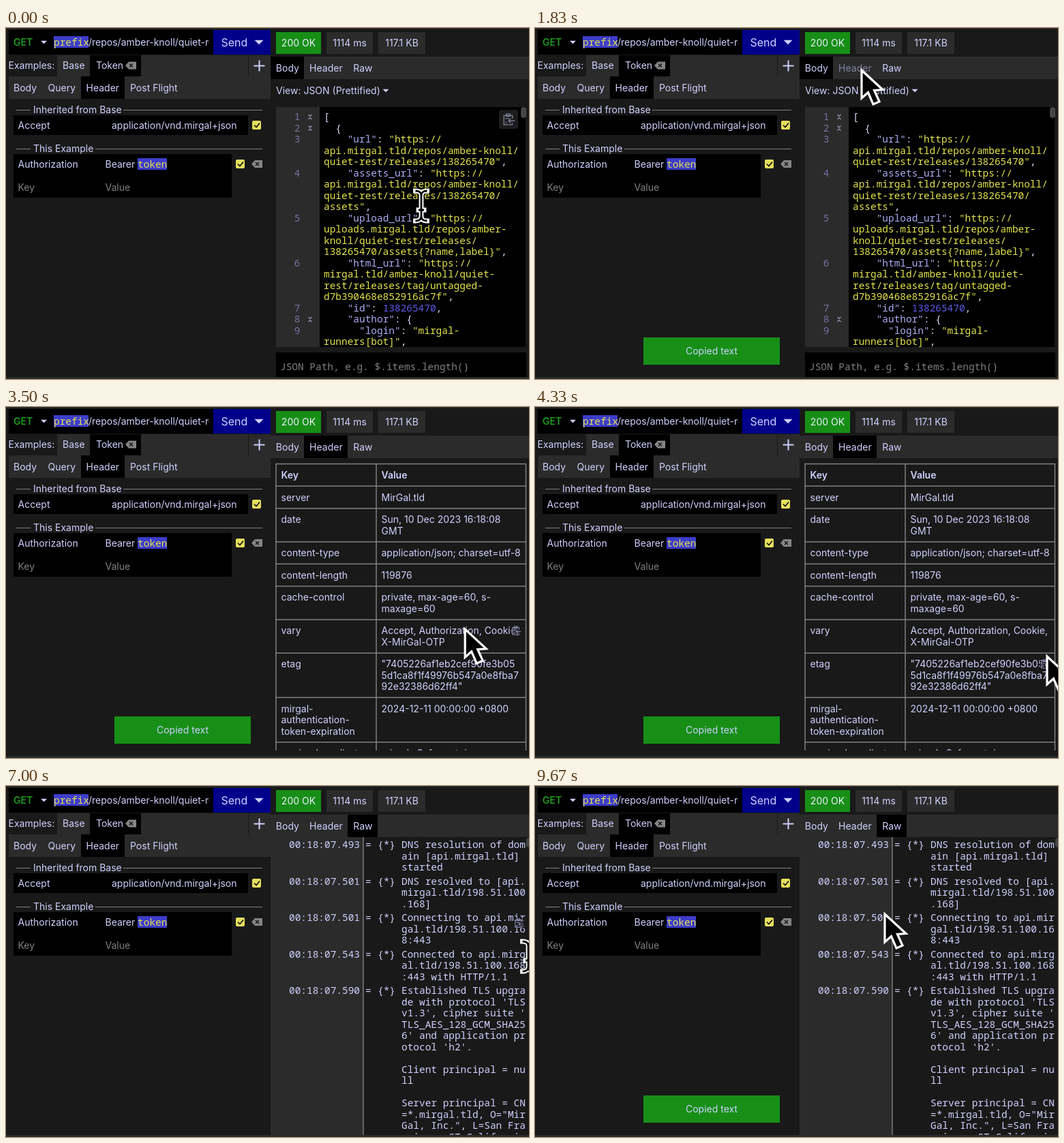
Animation, 767 px wide and 515 px high, one loop 9840 ms. Source, as an HTML page:

```html
<!DOCTYPE html>
<html lang="en">
<head>
<meta charset="utf-8">
<title>HTTP client</title>
<style>
  html, body { margin: 0; width: 100%; height: 100%; overflow: hidden; background: #191919; }
  svg { display: block; width: 767px; height: 515px; }
  text { font: 14px Inter, sans-serif; white-space: pre; }
  .mono { font: 14.45px "Noto Sans Mono", monospace; }
  .big { font-size: 16px; }
  .bold { font-weight: 600; }
</style>
</head>
<body>
<svg id="stage" viewBox="0 0 767 515"></svg>
<script>
const INK = '#d0d0ff', PANEL = '#191919', LIGHT = '#2b2b2b', GREEN = '#178f17',
      YELLOW = '#e4e44c', GRAY = '#808080';
const stage = document.getElementById('stage');

function el(tag, attrs, parent = stage) {
  const node = document.createElementNS('http://www.w3.org/2000/svg', tag);
  for (const key in attrs) node.setAttribute(key, attrs[key]);
  return parent.appendChild(node);
}
const group = (parent = stage) => el('g', {}, parent);
const box = (x, y, width, height, fill, parent, rx = 0) =>
  el('rect', { x, y, width, height, fill, rx }, parent);
const path = (d, stroke, width, parent, x = 0, y = 0) =>
  el('path', { d, stroke, 'stroke-width': width, fill: 'none', transform: `translate(${x} ${y})` }, parent);
const caret = (x, y, r, parent) =>
  el('path', { d: `M${x - r} ${y - r / 2}h${2 * r}l${-r} ${r}z`, fill: INK }, parent);

function text(x, y, str, parent, fill = INK, cls = '', anchor = 'start') {
  const node = el('text', { x, y, fill, class: cls, 'text-anchor': anchor }, parent);
  node.textContent = str;
  return node;
}
const mono = (x, y, str, parent, fill = INK, anchor) => text(x, y, str, parent, fill, 'mono', anchor);

function clipboard(x, y, size, color, parent) {
  const g = el('g', { transform: `translate(${x} ${y}) scale(${size / 16})` }, parent);
  path('M5-1V-5H-6V7H5V5M-3-7H2V-4H-3ZM8 2H0M3-1L0 2L3 5M-4-1H1M-4 4H-2', color, 1.2, g);
  return g;
}
function backspace(x, y, color) {
  el('path', { d: `M${x} ${y}l5-5.5h11v11h-11z`, fill: color });
  path('M6-2.5l5 5m0-5l-5 5', '#111', 1.4, stage, x, y);
}
function checkbox(x, y) {
  box(x, y, 13, 13, '#e6df5c', stage, 2);
  path('M3 6.5l3 3l5-6', '#111', 1.7, stage, x, y);
}

// Left pane
function drawRequest() {
  box(0, 0, 767, 1.5, LIGHT);
  box(4, 3, 300, 36, '#000');
  text(11, 26, 'GET', stage, '#1c9c1c', 'bold');
  caret(55.5, 21, 4.5);
  box(70, 12, 51, 17, '#3d3dcc');
  mono(70, 25.5, 'prefix', stage, YELLOW);
  text(121, 25.5, '/repos/amber-knoll/quiet-rest');
  box(298, 3, 6, 36, '#000');
  box(304, 3, 84, 36, '#00008b');
  text(315.5, 26.5, 'Send', stage, INK, 'big');
  caret(371, 21, 6.5);

  text(3.5, 60, 'Examples:');
  box(75, 40, 313, 31, LIGHT);
  text(83, 60, 'Base');
  box(123, 40, 75, 31, '#000');
  text(132, 60, 'Token');
  backspace(175, 55, '#858585');
  box(355, 40, 1, 31, PANEL);
  path('M363.5 55.5h16M371.5 47.5v16', INK, 2);

  box(4, 71, 384, 33, LIGHT);
  box(110, 71, 64, 33, '#000');
  [[11, 'Body'], [61.5, 'Query'], [117.5, 'Header'], [182, 'Post Flight']]
    .forEach(([x, label]) => text(x, 93, label));

  [[120, 'Inherited from Base', 172], [177, 'This Example', 131]].forEach(([y, label, x]) => {
    path(`M15 ${y + .5}H36M${x} ${y + .5}H376`, GRAY, 1);
    text(40, y + 5, label);
  });
  box(11, 128, 344, 29, '#000');
  text(17.5, 147.5, 'Accept');
  text(155, 147.5, 'application/vnd.mirgal+json');
  checkbox(361, 136);
  box(11, 185, 320, 64, '#000');
  text(17.5, 204.5, 'Authorization');
  text(145.5, 204.5, 'Bearer');
  box(193, 191, 43, 17, '#3d3dcc');
  mono(193, 204.5, 'token', stage, YELLOW);
  checkbox(337, 193);
  backspace(360, 199.5, '#858585');
  text(17.5, 239, 'Key', stage, GRAY);
  text(145.5, 239, 'Value', stage, GRAY);
}

// Right pane: status and tabs
const TABS = [['Body', 388, 49], ['Header', 437, 64], ['Raw', 501, 44]];
let tabNodes;
function drawStatus() {
  [[396, 66, '200 OK', GREEN], [470, 68, '1114 ms', LIGHT], [546, 69, '117.1 KB', LIGHT]]
    .forEach(([x, w, label, fill]) => {
      box(x, 6, w, 32, fill);
      text(x + w / 2, 27, label, stage, label === '200 OK' ? '#eeeeff' : INK, '', 'middle');
    });
  box(388, 42, 379, 33, LIGHT);
  tabNodes = TABS.map(([label, x, w]) => ({
    back: box(x, 42, w, 33, '#000'),
    label: text(x + w / 2 + .4, 64, label, stage, INK, '', 'middle')
  }));
}

const API = 'api.mirgal.tld/repos/amber-knoll/', ID = '138265470';
const JSON_LINES = [
  '[', '  {',
  '    "url": "https://', API, `quiet-rest/releases/${ID}",`,
  '    "assets_url": "https://', API, `quiet-rest/releases/${ID}/`, 'assets",',
  '    "upload_url": "https://', 'uploads.mirgal.tld/repos/amber-',
  'knoll/quiet-rest/releases/', `${ID}/assets{?name,label}",`,
  '    "html_url": "https://', 'mirgal.tld/amber-knoll/quiet-',
  'rest/releases/tag/untagged-', 'd7b390468e852916ac7f",',
  `    "id": ${ID},`, '    "author": {', '      "login": "mirgal-', 'runners[bot]",'
];
let copyAll;

function drawBody(g) {
  text(396, 96.5, 'View: JSON (Prettified)', g);
  caret(557, 92, 4.5, g);
  box(396, 116, 64, 352, LIGHT, g);
  box(460, 116, 302, 352, '#000', g);
  let number = 0;
  JSON_LINES.forEach((line, i) => {
    const y = 135 + 16.5 * i;
    const [, indent, key = '', value, end] = line.match(/^( *)("\w+": )?(.*?)([,{[]?)$/);
    if (indent || line === '[') mono(431.5, y, ++number, g, '#7474a4', 'end');
    if (/[{[]$/.test(line))
      path('M-2.5-3.5L0-1L2.5-3.5M-2.5 3.5L0 1L2.5 3.5', '#a0a0c4', 1.1, g, 446, y - 4.5);
    const row = mono(466, y, indent, g);
    const isNumber = key && /^\d/.test(value);
    [[key.slice(0, -2), '#acacf6'], [key.slice(-2), '#dedeff'],
     [value, isNumber ? '#5c5ce6' : YELLOW], [end, '#dedeff']]
      .forEach(([str, fill]) => { el('tspan', { fill }, row).textContent = str; });
  });
  box(396, 468, 371, 8, PANEL, g);
  copyAll = group(g);
  box(723, 120, 28, 28, '#1c1c1c', copyAll, 4);
  clipboard(737, 134, 18, '#80809c', copyAll);
  box(755, 116, 8, 16, '#474747', g, 4);
  box(396, 476, 367, 36, '#000', g);
  mono(402, 501.5, 'JSON Path, e.g. $.items.length()', g, GRAY);
}

const HEADERS = [
  ['Key', 'Value'], ['server', 'MirGal.tld'], ['date', 'Sun, 10 Dec 2023 16:18:08|GMT'],
  ['content-type', 'application/json; charset=utf-8'], ['content-length', '119876'],
  ['cache-control', 'private, max-age=60, s-|maxage=60'],
  ['vary', 'Accept, Authorization, Cookie,|X-MirGal-OTP'],
  ['etag', '"7405226af1eb2cef90fe3b05|5d1ca8f1f49976b547a0e8fba7|92e32386d62ff4"'],
  ['mirgal-|authentication-|token-expiration', '2024-12-11 00:00:00 +0800'],
  ['x-mirgal-media-type', 'mirgal.v3; format=json']
];
const headerTops = [];
function drawHeaders(g) {
  let top = 83.5;
  HEADERS.forEach((cells, i) => {
    const columns = cells.map(cell => cell.split('|'));
    columns.forEach((lines, c) => lines.forEach((line, n) =>
      text(c ? 550.5 : 403.5, top + 21.5 + 16.4 * n, line, g, INK, i ? '' : 'bold')));
    path(`M395 ${top}H763`, GRAY, 1.5, g);
    headerTops.push(top);
    top += 16.2 + 16.4 * Math.max(...columns.map(lines => lines.length));
  });
  path('M396 83V504M543 83V504M762.5 83V504', GRAY, 1.5, g);
  box(388, 504, 379, 8, PANEL, g);
}

const LOG = [
  ['493', 'DNS resolution of dom|ain [api.mirgal.tld] |started'],
  ['501', 'DNS resolved to [api.|mirgal.tld/198.51.100|.168]'],
  ['501', 'Connecting to api.mir|gal.tld/198.51.100.16|8:443'],
  ['543', 'Connected to api.mirg|al.tld/198.51.100.168|:443 with HTTP/1.1'],
  ['590', "Established TLS upgra|de with protocol 'TLS|v1.3', cipher suite '|TLS_AES_128_GCM_SHA25|" +
    "6' and application pr|otocol 'h2'.||Client principal = nu|ll||Server principal = CN|" +
    '=*.mirgal.tld, O="Mir|Gal, Inc.", L=San Fra|ncisco, ST=California']
];
const logTops = [];
function drawLog(g) {
  box(388, 75, 136, 437, LIGHT, g);
  path('M524 75V512', '#8a8a8a', 1.3, g);
  let y = 91;
  LOG.forEach(([ms, message]) => {
    logTops.push(y - 14);
    mono(519, y, '00:18:07.' + ms, g, INK, 'end');
    mono(527, y, '=', g);
    mono(545, y, '{*}', g);
    message.split('|').forEach(line => { mono(580, y, line, g); y += 16.5; });
    y += 4;
  });
  box(763, 76, 8, 14, '#474747', g, 4);
}

drawRequest();
drawStatus();
const views = [drawBody, drawHeaders, drawLog].map(draw => {
  const g = group();
  draw(g);
  return g;
});
box(0, 512, 767, 3, LIGHT);

const copyIcon = group();
box(-8, -8, 16, 16, PANEL, copyIcon).setAttribute('opacity', .6);
clipboard(0, 0, 14, '#9090b4', copyIcon);

const toast = group();
box(159, 454, 200, 40, GREEN, toast);
text(259, 479, 'Copied text', toast, INK, '', 'middle');

const arrow = group();
el('path', { d: 'M0 0V41L9.5 32.5L17 50L26 46L18.5 29.5L31 28.5Z',
  fill: '#000', stroke: '#fff', 'stroke-width': 3.2 }, arrow);
const beam = group();
const BEAM = 'M-8.5-22Q0-22 0-15V15Q0 22-8.5 22M8.5-22Q0-22 0-15M8.5 22Q0 22 0 15M-4 6H4';
path(BEAM, '#fff', 6.8, beam).setAttribute('stroke-linecap', 'square');
path(BEAM, '#000', 2.8, beam);

// Timeline in ms
const LOOP = 9840, STEP = 1000 / 6;
const COPIES = [500, 2667, 4667, 7833];
const MOVES = [
  [0, 609, 261], [500, 735, 134], [833, 735, 134], [1833, 479, 62], [2000, 475, 62],
  [2500, 527, 252], [2833, 528, 250], [3667, 690, 335], [4000, 758, 385], [4333, 751, 366],
  [4833, 749, 374], [5833, 571, 80], [6167, 524, 62], [6333, 524, 62], [7000, 766, 250],
  [7333, 752, 216], [7667, 752, 216], [7833, 752, 215], [8667, 690, 300], [9667, 513, 188]
];

function cursorAt(t) {
  const i = MOVES.findIndex(move => move[0] > t);
  if (i < 0) return MOVES.at(-1).slice(1);
  const [t0, x0, y0] = MOVES[i - 1], [t1, x1, y1] = MOVES[i];
  const p = (t - t0) / (t1 - t0), e = p * p * (3 - 2 * p);
  return [x0 + (x1 - x0) * e, y0 + (y1 - y0) * e];
}
function toastOpacity(t) {
  const age = t - COPIES.findLast(start => start <= t + 1);
  return age >= 0 ? Math.max(0, Math.min(1, (2010 - age) / 170)) : 0;
}
function hoverIcon(view, x, y) {
  if (view === 1 && x > 396 && y > 116 && y < 504)
    return [x < 543 ? 530 : 748, headerTops.findLast(top => top <= y) + 16];
  if (view === 2 && x > 530 && y > 100)
    return [752, logTops.findLast(top => top <= y - 22) + 17];
}
const show = (node, on) => node.setAttribute('display', on ? 'inline' : 'none');
const place = (node, x, y) => node.setAttribute('transform', `translate(${x} ${y})`);

function frame(now) {
  const t = Math.floor(((now % LOOP) + 5) / STEP) * STEP;
  const view = t < 1999 ? 0 : t < 6332 ? 1 : 2;
  const [x, y] = cursorAt(t + .5);
  views.forEach((g, i) => show(g, i === view));
  tabNodes.forEach(({ back, label }, i) => {
    const [, left, w] = TABS[i];
    const hover = x > left && x < left + w && y > 42 && y < 75;
    show(back, i === view);
    label.setAttribute('fill', hover && i !== view ? '#8080a2' : INK);
  });
  const icon = hoverIcon(view, x, y);
  show(copyIcon, icon);
  if (icon) place(copyIcon, ...icon);
  toast.setAttribute('opacity', toastOpacity(t));

  const inCode = view === 0 && x > 396 && y > 116 && y < 468;
  show(copyAll, inCode);
  const overText = inCode && x > 460 && !(x > 723 && y < 148);
  const isBeam = overText || (view === 2 && x > 524 && y > 76);
  show(beam, isBeam);
  show(arrow, !isBeam);
  place(isBeam ? beam : arrow, x, y);
  requestAnimationFrame(frame);
}
requestAnimationFrame(frame);
</script>
</body>
</html>
```
